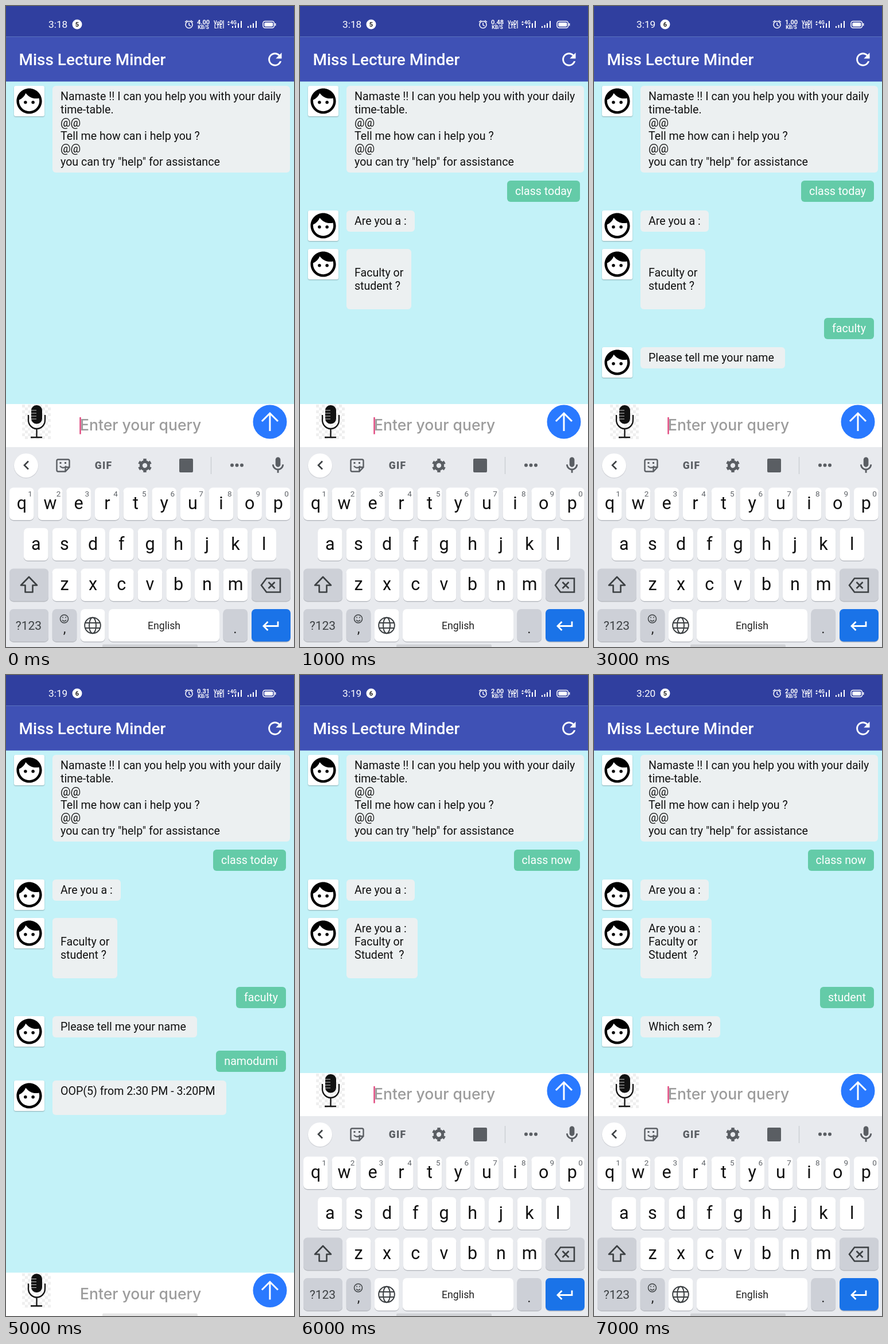
These frames come from a looping animation (502x1116 px, 8000 ms). An HTML page:

```html
<!DOCTYPE html>
<html lang="en">
<head>
<meta charset="utf-8">
<title>Chat assistant</title>
<style>
  html, body { margin: 0; width: 100%; height: 100%; overflow: hidden; }
  body { position: relative; background: #c3f2f8; font-family: Roboto, sans-serif; }
  #chat { position: absolute; inset: 0; font-size: 19.6px; line-height: 22.85px; color: #111; }
  .bubble {
    position: absolute; left: 81px; padding: 8px 14px 6px; border-radius: 6px;
    box-sizing: border-box; background: #ecf0f1; white-space: pre;
  }
  .bubble.wide { width: 414px; }
  .bubble.user { left: auto; right: 14px; background: #64cba8; color: #fff; }
  .avatar {
    position: absolute; left: 14px; width: 53px; height: 53px; border-radius: 3px;
    background: #fff; box-shadow: 0 1px 2px rgba(0, 0, 0, .28);
  }
  .avatar svg { display: block; width: 53px; height: 53px; }
  #ui { position: absolute; left: 0; top: 0; width: 502px; height: 1116px; overflow: hidden; }
  text { font-family: Roboto, sans-serif; }
  .mid { text-anchor: middle; }
  .tiny { font-size: 8.6px; font-weight: 700; fill: #fff; }
  .line { fill: none; stroke: #3c4043; stroke-width: 2.6; }
  .tool { fill: none; stroke: #5a5e63; stroke-width: 2.4; }
  .solid { fill: #5a5e63; }
  .key { font-size: 30.5px; fill: #111; }
  .num { font-size: 13.5px; fill: #5f6368; }
  #entry { font: 500 26.5px Inter, sans-serif; }
</style>
</head>
<body>
<div id="chat"></div>
<svg id="ui" viewBox="0 0 502 1116">
  <defs>
    <pattern id="checks" width="10" height="10" patternUnits="userSpaceOnUse" x="28" y="694">
      <rect width="10" height="10" fill="#fff"/>
      <path d="M0 0h5v5h-5zM5 5h5v5h-5z" fill="#efefef"/>
    </pattern>
  </defs>

  <g id="header">
    <rect width="502" height="53.5" fill="#303f9f"/>
    <rect y="53.5" width="502" height="78" fill="#3f51b5"/>
    <text id="clock" x="74" y="38" font-size="17.3" fill="#fff"></text>
    <circle cx="124" cy="32" r="8.5" fill="#fff"/>
    <text id="badge" class="mid" x="124" y="36" font-size="11" font-weight="700" fill="#222"></text>
    <g fill="none" stroke="#fff" stroke-width="1.5">
      <circle cx="319" cy="32.5" r="6"/>
      <path d="M319 29v4l3 2M312 28l4-3M326 28l-4-3"/>
      <rect x="448" y="26.5" width="19.5" height="11.5" rx="3.5"/>
    </g>
    <rect x="450.3" y="28.8" width="15" height="7" rx="1.8" fill="#fff"/>
    <path d="M469.5 30v4.5" stroke="#fff" stroke-width="1.8"/>
    <text id="rate" class="mid" x="344" y="32" font-size="11" font-weight="700" fill="#fff"></text>
    <text class="tiny mid" x="344" y="40">KB/S</text>
    <text class="tiny mid" x="370" y="31.5">VoD</text>
    <text class="tiny mid" x="370" y="39">LTE</text>
    <path d="M379 25v14" stroke="#fff" stroke-width="1.3"/>
    <path d="M386 29l2-3 2 3zM386 31l2 3 2-3z" fill="#fff"/>
    <text class="tiny" x="391" y="32">4G</text>
    <path d="M395 38v-3M400 38v-4.500M405 38v-8M410 38v-12M422 38v-3M426.500 38v-5M431 38v-8M436 38v-12"
          stroke="#fff" stroke-width="2"/>
    <text x="22.5" y="103" font-size="27.9" font-weight="500" fill="#fff">Miss Lecture Minder</text>
    <path transform="translate(451.3 75.500) scale(1.46)" fill="#fff"
          d="M17.65 6.35C16.2 4.9 14.21 4 12 4c-4.42 0-7.99 3.58-7.99 8s3.57 8 7.99 8c3.73 0 6.84-2.55 7.73-6h-2.08c-.82 2.33-3.04 4-5.65 4-3.31 0-6-2.69-6-6s2.69-6 6-6c1.66 0 3.14.69 4.22 1.78L13 11h7V4l-2.35 2.35z"/>
  </g>

  <g id="bar">
    <rect y="693" width="502" height="76" fill="#fff"/>
    <rect x="28" y="694" width="50" height="60" fill="url(#checks)"/>
    <rect x="44" y="695" width="19" height="32.5" rx="9" fill="#111"/>
    <path d="M44 704h9M44 709h9M44 714h9M44 719h9" stroke="#ccc" stroke-width="1.1"/>
    <path d="M39 712v9a14.500 15 0 0 0 29 0v-9M53.500 736v14M43 751h20" fill="none" stroke="#111" stroke-width="2.3"/>
    <text id="entry" x="129" y="739"></text>
    <rect id="rule" x="129" y="742" height="1.6" fill="#222"/>
    <rect id="caret" y="716" width="2.4" height="29.500" fill="#e0447c"/>
    <circle cx="460" cy="724" r="29.5" fill="#2979ff"/>
    <path d="M460 740v-31M446 723l14-14 14 14" fill="none" stroke="#fff" stroke-width="3"/>
  </g>

  <g id="board">
    <rect y="768" width="502" height="348" fill="#e8eaee"/>
    <circle cx="35" cy="801" r="21.5" fill="#d3d5da"/>
    <circle cx="35" cy="800" r="21" fill="#fff"/>
    <path id="chevron" class="line"/>
    <path class="solid" transform="translate(456.8 782.500) scale(1.44)"
          d="M12 14c1.66 0 3-1.34 3-3V5c0-1.66-1.34-3-3-3S9 3.34 9 5v6c0 1.66 1.34 3 3 3zm5-3c0 2.76-2.24 5-5 5s-5-2.24-5-5H5c0 3.53 2.61 6.43 6 6.92V21h2v-3.08c3.39-.49 6-3.39 6-6.92h-2z"/>
    <text id="hint" class="mid solid" x="249.500" y="809" font-size="25"></text>
    <g id="tools">
      <path class="tool" d="M91 789.500h17q2.500 0 2.500 2.500v11l-7 7.500H91q-2.500 0-2.500-2.500v-16q0-2.500 2.500-2.500zM110 803h-6.500v7M94 801q5.500 6 11 0"/>
      <path class="solid" d="M93.500 794h3v3h-3zM102 794h3v3h-3z"/>
      <text class="mid solid" x="170" y="805.5" font-size="17.500" font-weight="900" letter-spacing="1.2">GIF</text>
      <g transform="rotate(30 242 800)">
        <circle class="tool" cx="242" cy="800" r="6.700" style="stroke-width:5"/>
        <circle class="tool" cx="242" cy="800" r="10" pathLength="60" stroke-dasharray="5 5" stroke-dashoffset="2.5" style="stroke-width:4"/>
      </g>
      <rect class="solid" x="302" y="788" width="24" height="24" rx="2"/>
      <path d="M357.500 785v30" stroke="#c9ccd1" stroke-width="1.3"/>
      <path class="tool" d="M394 799.500h0M402.500 799.500h0M411 799.500h0" stroke-linecap="round" style="stroke-width:6"/>
    </g>
    <g id="keys"></g>
    <path class="line" d="M40 994l-14 14.500h7.500v12h13v-12H54z" stroke-linejoin="round"/>
    <path class="line" d="M454 996.500h24v24h-24l-9-12zM457.500 1003l11 11m0-11l-11 11"/>
    <text class="mid" x="39.500" y="1086" font-size="21" fill="#3c4043">?123</text>
    <g class="line" style="stroke-width:1.5">
      <circle cx="101.500" cy="1067" r="7"/>
      <path d="M98 1069q3.500 4 7 0M99 1063.500v2M104 1063.500v2"/>
    </g>
    <text class="mid" x="102" y="1092" font-size="24" fill="#222">,</text>
    <g class="line" style="stroke-width:2">
      <circle cx="151" cy="1078.500" r="13.8"/>
      <ellipse cx="151" cy="1078.500" rx="6" ry="13.8"/>
      <path d="M138 1074h26M138 1083h26"/>
    </g>
    <text class="mid" x="275.500" y="1085" font-size="17.700" fill="#222">English</text>
    <text class="mid" x="399.500" y="1092" font-size="24" fill="#222">.</text>
    <path d="M474 1071.500v8h-25M456.500 1072l-7.500 7.500 7.500 7.500" fill="none" stroke="#fff" stroke-width="2.800"/>
  </g>
  <rect x="168" y="1111.500" width="166" height="6" rx="2" fill="#000" opacity=".1"/>
</svg>

<script>
const $ = id => document.getElementById(id);

const face = `<svg viewBox="0 0 24 24"><circle cx="9" cy="13" r="1.25"/><circle cx="15" cy="13" r="1.25"/>
<path d="M12 2C6.48 2 2 6.48 2 12s4.48 10 10 10 10-4.48 10-10S17.52 2 12 2zm0 18c-4.41 0-8-3.59-8-8 0-.29.02-.58.05-.86 2.36-1.05 4.23-2.98 5.21-5.37C11.07 8.33 14.05 10 17.42 10c.78 0 1.53-.09 2.25-.26.21.71.33 1.47.33 2.26 0 4.41-3.59 8-8 8z"/></svg>`;

// Keyboard
const PITCH = 49.67, GREY = '#cdd0d7';
let keys = '';
function addKey(x, y, w, fill = '#fff', label = '', num = '') {
  const box = (dy, color) =>
    `<rect x="${x}" y="${y + dy}" width="${w}" height="56.5" rx="7" fill="${color}"/>`;
  keys += box(1.4, '#b9bcc2') + box(0, fill);
  if (label) keys += `<text class="key mid" x="${x + w / 2}" y="${y + 37.5}">${label}</text>`;
  if (num) keys += `<text class="num mid" x="${x + 36}" y="${y + 15.5}">${num}</text>`;
}
[['qwertyuiop', 6, 838.5], ['asdfghjkl', 31, 909], ['zxcvbnm', 80.7, 979.5]].forEach(([row, x, y], r) =>
  [...row].forEach((c, i) => addKey(x + i * PITCH, y, 42.6, '#fff', c, r ? '' : String((i + 1) % 10))));
addKey(6, 979.5, 68, GREY);
addKey(428, 979.5, 68, GREY);
addKey(6, 1050, 68, GREY);
addKey(80.7, 1050, 42.6, GREY);
addKey(130, 1050, 42.6);
addKey(179, 1050, 193);
addKey(378.5, 1050, 42.6, GREY);
addKey(428, 1050, 68, '#1a73e8');
$('keys').innerHTML = keys;

// Conversation
const bot = (y, text, cls = '') => ({ y, text, cls });
const user = (y, text) => ({ y, text, cls: 'user' });
const NAME = 'namodumi';

const hello = [bot(139, 'Namaste !! I can you help you with your daily\ntime-table.\n@@\n' +
  'Tell me how can i help you ?\n@@\nyou can try "help" for assistance', 'wide')];
const today = [...hello, user(304, 'class today'), bot(356, 'Are you a :'),
  bot(423, ' \nFaculty or\nstudent ?\n ')];
const faculty = [...today, user(543, 'faculty'), bot(594, 'Please tell me your name ')];
const answer = [...faculty, user(654, NAME), bot(706, 'OOP(5) from 2:30 PM - 3:20PM \n ')];
const current = [...hello, user(304, 'class now'), bot(356, 'Are you a :'),
  bot(423, 'Are you a : \nFaculty or\nStudent  ?\n ')];
const student = [...current, user(543, 'student'), bot(594, 'Which sem ?')];

const steps = [
  { chat: hello, clock: '3:18', badge: 5, rate: '4.00' },
  { chat: today, clock: '3:18', badge: 5, rate: '0.48' },
  { chat: today, clock: '3:18', badge: 5, rate: '0.48', typed: 'faculty' },
  { chat: faculty, clock: '3:19', badge: 6, rate: '1.00' },
  { chat: faculty, clock: '3:19', badge: 6, rate: '1.00', typed: NAME },
  { chat: answer, clock: '3:19', badge: 6, rate: '0.31', closed: true },
  { chat: current, clock: '3:19', badge: 6, rate: '2.00' },
  { chat: student, clock: '3:20', badge: 5, rate: '2.00' },
];

const show = (id, on) => { $(id).style.display = on ? '' : 'none'; };

function render({ chat, clock, badge, rate, typed = '', closed = false }) {
  $('chat').innerHTML = chat.map(({ y, text, cls }) =>
    (cls === 'user' ? '' : `<div class="avatar" style="top:${y}px">${face}</div>`) +
    `<div class="bubble ${cls}" style="top:${y}px">${text}</div>`).join('');
  $('clock').textContent = clock;
  $('badge').textContent = badge;
  $('rate').textContent = rate;

  const entry = $('entry');
  entry.textContent = typed || 'Enter your query';
  entry.setAttribute('fill', typed ? '#222' : '#9c9c9c');
  const width = typed ? entry.getComputedTextLength() : 0;
  $('rule').setAttribute('width', width);
  $('caret').setAttribute('x', 128.3 + width);
  $('bar').setAttribute('transform', `translate(0 ${closed ? 347.5 : 0})`);
  show('caret', !closed);
  show('board', !closed);
  show('tools', !typed);
  $('hint').textContent = typed;
  $('chevron').setAttribute('d', typed ? 'M31 792.5l7 7-7 7' : 'M39 792.5l-7 7 7 7');
}

let last = -1;
function tick(now) {
  const step = Math.floor(now / 1000) % steps.length;
  if (step !== last) render(steps[last = step]);
  requestAnimationFrame(tick);
}
render(steps[0]);
requestAnimationFrame(tick);
</script>
</body>
</html>
```
